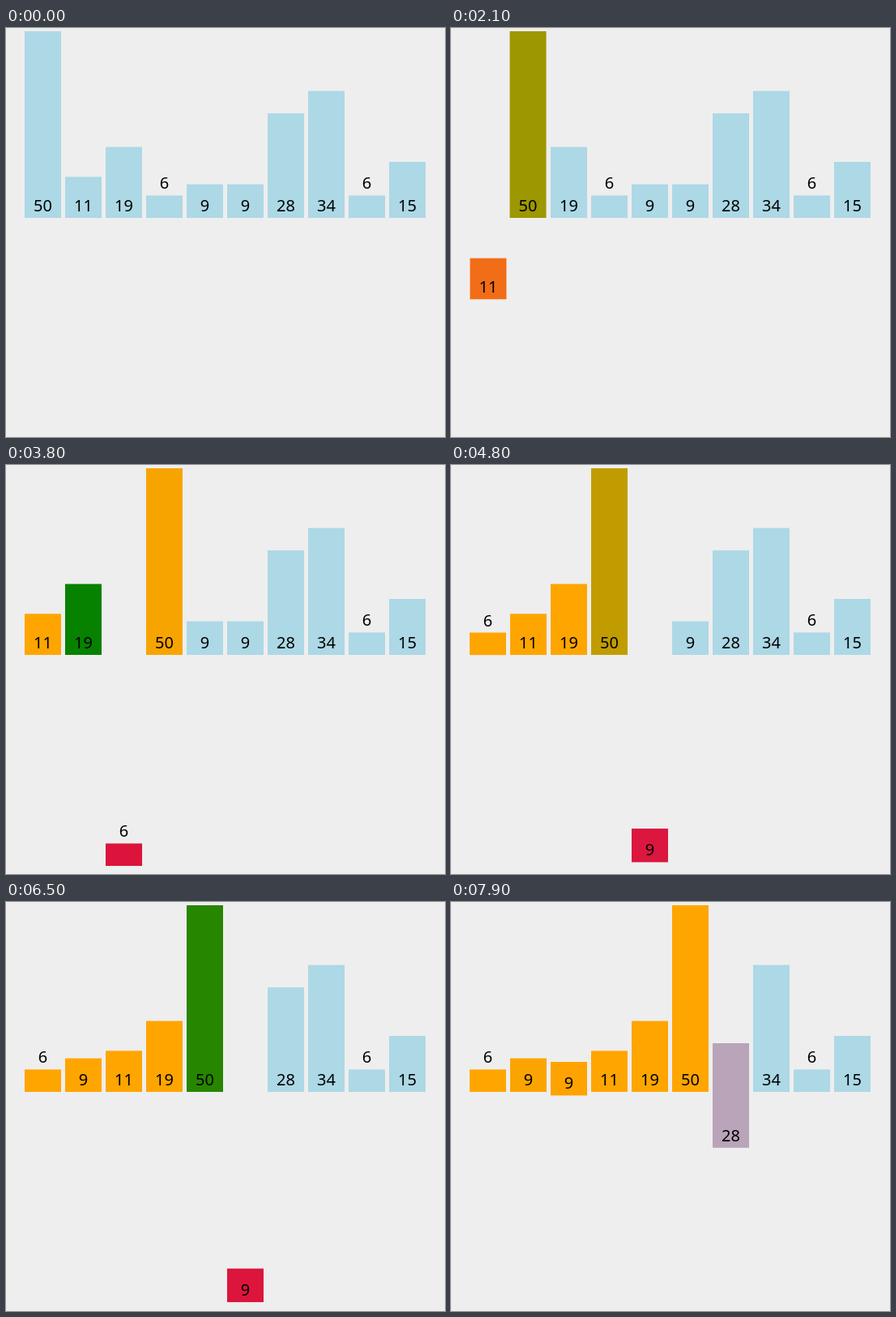
An HTML page with a canvas that plays this animation: 542 by 504 pixels, repeating every 8000 ms.

```html
<!DOCTYPE html>
<html lang="en">
<head>
<meta charset="utf-8">
<title>Insertion sort</title>
<style>
  html, body { margin: 0; width: 100%; height: 100%; overflow: hidden; background: #eee; }
  canvas { display: block; }
</style>
</head>
<body>
<canvas id="stage" width="542" height="504"></canvas>
<script>
const ctx = document.getElementById('stage').getContext('2d');

const LOOP = 8000, TICK = 100;
const START = 1251, HOLD = 1400;          // first step begins, first visible change
const STEP = 182.2, DURATION = 222;       // each step cuts the previous transition short
const LEFT = 23, PITCH = 50, BAR = 45, UNIT = 4.6, BASE = 234, DROP = 260;

const BLUE = [173, 216, 230], ORANGE = [255, 165, 0],
      GREEN = [0, 128, 0], RED = [220, 20, 60];
const values = [50, 11, 19, 6, 9, 9, 28, 34, 6, 15];

const place = slot => LEFT + PITCH * slot;
// A pose is [x, bottom, r, g, b] for each bar.
const initial = values.map((_, i) => [place(i), BASE, ...BLUE]);

function buildSteps(passes) {
  const steps = [], order = values.map((_, i) => i);
  const pose = initial.map(p => [...p]);
  const paint = (bar, color) => pose[bar].splice(2, 3, ...color);
  const save = () => steps.push(pose.map(p => [...p]));

  paint(0, ORANGE);
  save();
  for (let i = 1; i <= passes; i++) {
    const key = order[i];
    paint(key, RED);
    pose[key][1] = BASE + DROP;
    save();
    let slot = i;
    while (slot > 0) {
      const other = order[slot - 1];
      paint(other, GREEN);
      save();
      if (values[other] > values[key]) {
        pose[other][0] = place(slot);
        pose[key][0] = place(slot - 1);
        save();
        order[slot--] = other;
        paint(other, ORANGE);
      } else {
        paint(other, ORANGE);
        break;
      }
    }
    order[slot] = key;
    paint(key, ORANGE);
    pose[key][1] = BASE;
    save();
  }
  return steps;
}

const steps = buildSteps(6);
const ease = t => t < 0.5 ? 4 * t ** 3 : 1 - 4 * (1 - t) ** 3;
const blend = (from, to, k) =>
  from.map((p, i) => p.map((v, j) => v + (to[i][j] - v) * k));

function poseAt(time) {
  let pose = initial;
  if (time < HOLD) return pose;
  for (let i = 0, left = time - START; left > 0 && i < steps.length; i++, left -= STEP) {
    pose = blend(pose, steps[i], ease(Math.min(left, STEP) / DURATION));
  }
  return pose;
}

function draw(now) {
  const time = Math.floor((now % LOOP) / TICK) * TICK;
  ctx.fillStyle = '#eee';
  ctx.fillRect(0, 0, 542, 504);
  ctx.font = '20px "Noto Sans", "Open Sans", sans-serif';
  ctx.textAlign = 'center';
  poseAt(time).forEach(([x, bottom, ...rgb], i) => {
    const height = values[i] * UNIT;
    ctx.fillStyle = `rgb(${rgb.map(Math.round)})`;
    ctx.fillRect(x, bottom - height, BAR, height);
    // Short bars carry their label on top.
    const baseline = (height < 30 ? bottom - height : bottom) - 8;
    ctx.fillStyle = '#000';
    ctx.fillText(values[i], x + BAR / 2, Math.round(baseline));
  });
  requestAnimationFrame(draw);
}
requestAnimationFrame(draw);
</script>
</body>
</html>
```
